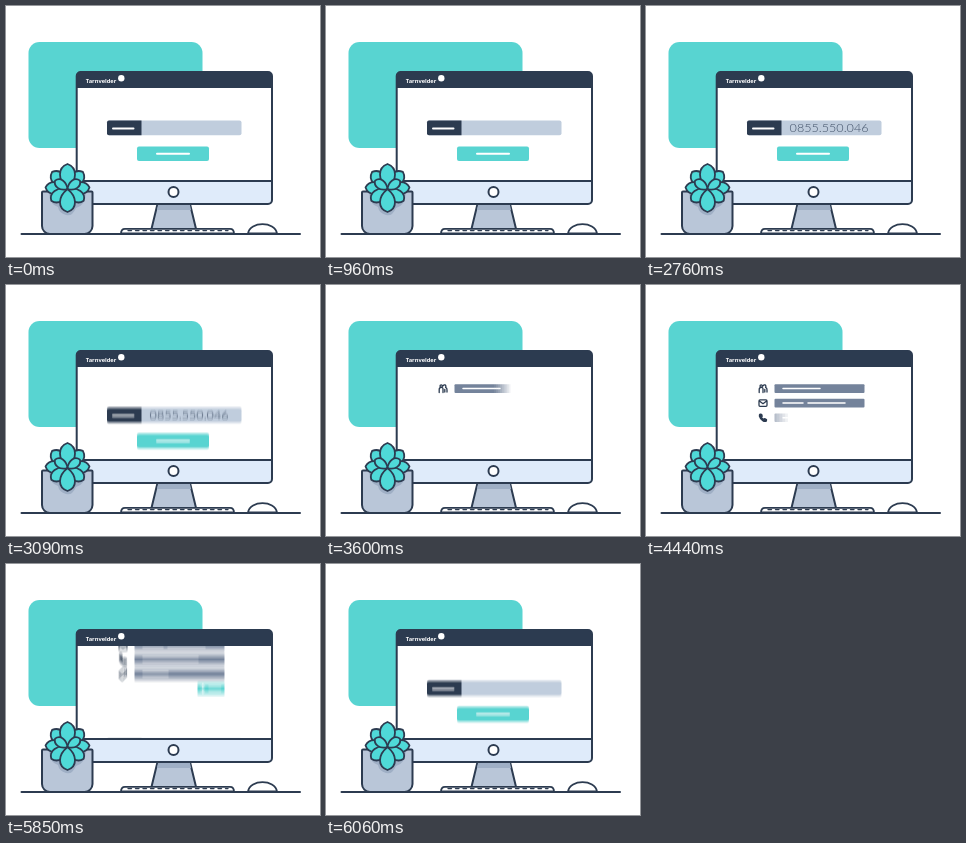
An HTML page with a canvas for the animation above (6.09 s loop, 314x251 px).

```html
<!DOCTYPE html>
<html lang="en">
<head>
<meta charset="utf-8">
<title>Desktop lookup</title>
<style>
  html, body { margin: 0; width: 314px; height: 251px; overflow: hidden; background: #fff; }
  canvas { display: block; }
</style>
</head>
<body>
<canvas id="stage" width="314" height="251"></canvas>
<script>
const W = 314, H = 251, LOOP = 6090;
const INK = '#2c3b50', TEAL = '#58d4d1', GREY = '#b9c6d8', FIELD = '#c0cddd', BAR = '#74839b';
const NUMBER = '0855.550.046';
const SHUTTER = 30, SAMPLES = 10;

const layer = () => Object.assign(document.createElement('canvas'), { width: W, height: H });
const stage = document.getElementById('stage').getContext('2d');
const backdrop = layer(), screen = layer();

const clamp = v => Math.min(1, Math.max(0, v));
const progress = (t, start, length) => clamp((t - start) / length);
const outCubic = u => 1 - (1 - u) ** 3;
const outBack = (u, c = 2.5) => 1 + (c + 1) * (u - 1) ** 3 + c * (u - 1) ** 2;
const smooth = u => u * u * (3 - 2 * u);

function box(g, x, y, w, h, r, fill, stroke) {
  g.beginPath();
  g.roundRect(x, y, w, h, r);
  paint(g, fill, stroke);
}

function disc(g, x, y, r, fill, stroke) {
  g.beginPath();
  g.arc(x, y, r, 0, 7);
  paint(g, fill, stroke);
}

function shape(g, d, fill, stroke) {
  const p = new Path2D(d);
  if (fill) { g.fillStyle = fill; g.fill(p); }
  if (stroke) { g.strokeStyle = stroke; g.stroke(p); }
}

function paint(g, fill, stroke) {
  if (fill) { g.fillStyle = fill; g.fill(); }
  if (stroke) { g.strokeStyle = stroke; g.stroke(); }
}

function line(g, x1, x2, y, width, color = '#fff') {
  g.lineWidth = width;
  g.strokeStyle = color;
  g.beginPath();
  g.moveTo(x1, y);
  g.lineTo(x2, y);
  g.stroke();
}

function leaf(g, angle, length, width) {
  g.save();
  g.translate(61.5, 183);
  g.rotate(angle * Math.PI / 180);
  g.beginPath();
  g.moveTo(0, 0);
  g.bezierCurveTo(-width, -length * 0.35, -width, -length * 0.86, 0, -length);
  g.bezierCurveTo(width, -length * 0.86, width, -length * 0.35, 0, 0);
  paint(g, '#4fd9d8', INK);
  g.restore();
}

function drawPlant(g) {
  g.lineWidth = 2;
  box(g, 36, 185.5, 50.5, 42.5, [1, 1, 8, 8], GREY, INK);
  shape(g, 'M43 187H80Q79 200 70 202Q66 211 60 209Q53 207 52 201Q44 199 43 187Z', '#9fafc5');
  g.lineWidth = 1.8;
  leaf(g, -42, 23, 9);
  leaf(g, 42, 23, 9);
  leaf(g, 0, 25, 10);
  leaf(g, -86, 22, 8);
  leaf(g, 86, 22, 8);
  leaf(g, -126, 20, 8);
  leaf(g, 126, 20, 8);
  leaf(g, -56, 15, 6);
  leaf(g, 56, 15, 6);
  leaf(g, 180, 23, 10);
}

function drawBackdrop() {
  const g = backdrop.getContext('2d');
  g.lineCap = g.lineJoin = 'round';
  g.fillStyle = '#fff';
  g.fillRect(0, 0, W, H);
  box(g, 22.5, 36, 174, 106, 11, TEAL);

  // monitor
  g.lineWidth = 2;
  shape(g, 'M151.5 198H184L191 227H144.5Z', GREY, INK);
  shape(g, 'M152 199H184L185 204H151Z', '#9fafc5');
  box(g, 70.7, 66, 195.3, 132, 4, '#fff');
  box(g, 71, 175, 195, 23, [0, 0, 4, 4], '#dfebfa');
  box(g, 71, 66, 195, 16, [4, 4, 0, 0], INK);
  line(g, 71, 266, 175, 1.8, INK);
  g.lineWidth = 2;
  box(g, 70.7, 66, 195.3, 132, 4, null, INK);
  disc(g, 167.5, 186, 5, '#fff', INK);

  g.fillStyle = '#fff';
  g.font = '700 5.7px "Open Sans", sans-serif';
  g.fillText('Tarnvelder', 79.8, 76.6);
  disc(g, 115.3, 72.3, 3.2, '#fff');

  // keyboard, mouse, desk
  g.lineWidth = 1.8;
  shape(g, 'M115 227.5Q115 222.8 119 222.8H224Q228 222.8 228 227.5Z', '#fff', INK);
  g.setLineDash([3.5, 4]);
  line(g, 122, 222, 224.6, 1.4, INK);
  g.setLineDash([]);
  g.lineWidth = 1.8;
  shape(g, 'M242 227.5C244 215 269 215 271 227.5Z', '#fff', INK);
  line(g, 15.5, 294, 228, 2, INK);

  drawPlant(g);
}

function drawForm(g, typed, caret) {
  box(g, 101, 114.5, 134.5, 14.8, 2, FIELD);
  box(g, 101, 114.5, 34.5, 14.8, [2, 0, 0, 2], INK);
  line(g, 107, 127.5, 122.5, 2);
  box(g, 131, 140.5, 72, 14.5, 2, TEAL);
  line(g, 151, 183, 147.8, 2);
  g.fillStyle = '#3f4f66';
  if (caret) g.fillRect(141, 117, 1, 9);
  g.font = '300 12.6px Lato, sans-serif';
  g.fillText(NUMBER.slice(0, typed), 143.6, 126);
}

// each icon is centred on 0,0
const icons = [
  'M-3.8 4V1Q-3.8-1.2-1.8-1.2T0 1V4M-3-2.5a1.2 1.2 0 1 0 2.4 0a1.2 1.2 0 1 0-2.4 0M.2-2.8Q.8-4 2-3.6Q3.4-3 2.6-1.2Q4.2-.6 4 1.4V3.6M1.8 1V3.6',
  'M-3-3.2H3Q4-3.2 4-2.2V2.2Q4 3.2 3 3.2H-3Q-4 3.2-4 2.2V-2.2Q-4-3.2-3-3.2ZM-3.6-2.2L0 .6L3.6-2.2',
  'M-2.8-3.6L-1.4-3.4L-.8-1.4L-1.6-.6Q-.8 1 .8 1.7L1.6.9L3.5 1.8L3.4 3.2Q2 4.4-.2 3Q-3 1-3.6-1.6Q-3.8-3-2.8-3.6Z',
  'M-3.8 .2L0-3.4L3.4-3.5L3.5-.4L-.3 3.6Q-1 4.1-1.7 3.4L-3.7 1.4Q-4.2.8-3.8.2ZM1.4-1.5h.3'
];

const rows = [
  { start: 3540, lines: [[137, 174]] },
  { start: 4010, lines: [[137, 157], [162, 199]] },
  { start: 4440, lines: [[137, 192]] },
  { start: 4890, lines: [[137, 162]] }
];

function drawRow(g, i, t, s) {
  const { start, lines } = rows[i], y = 103.5 + 14.6 * i;
  if (t >= 3330 + 450 * i) {
    g.save();
    g.translate(117, y);
    g.lineWidth = 1.3;
    shape(g, icons[i], i === 2 ? INK : null, INK);
    g.restore();
  }
  const reveal = outCubic(progress(s, start, 270));
  if (!reveal) return;
  g.save();
  g.beginPath();
  g.rect(128, y - 6, 91 * reveal, 12);
  g.clip();
  box(g, 128.5, y - 4.3, 90, 8.7, 1, BAR);
  for (const [a, b] of lines) line(g, a, b, y, 1.5);
  g.restore();
}

function drawAddButton(g, s) {
  const u = progress(s, 5120, 240);
  if (!u) return;
  const k = Math.max(0, outBack(u));
  g.save();
  g.translate(205, 162);
  g.scale(k, k);
  box(g, -13.5, -4.4, 27, 8.7, 1, TEAL);
  shape(g, 'M-8.9-2.4h1.5v1.6h1.6v1.5h-1.6v1.6h-1.5v-1.6h-1.6v-1.5h1.6Z', '#fff');
  line(g, -2, 9.7, 0, 1.5);
  g.restore();
}

// t drives hard changes, s is the shutter time that drives motion
function drawScreen(t, s) {
  const g = screen.getContext('2d');
  const scroll = 100 * smooth(progress(s, 5520, 575) ** 1.6);
  g.clearRect(0, 0, W, H);
  g.save();
  g.lineCap = g.lineJoin = 'round';
  g.beginPath();
  g.rect(96, 82, 144, 92);
  g.clip();
  g.fillStyle = '#fff';
  g.fillRect(96, 82, 144, 92);

  if (t < 3270 || t > 5500) {
    const back = t > 5500;
    const drop = back ? 100 - scroll : 63 * progress(s, 2760, 480) ** 5.5;
    const typed = back ? 0 : Math.max(0, Math.floor((t - 1845) / 75) + 1);
    const caret = t < 1920 && Math.floor(t / 60) % 2 === 1;
    g.save();
    g.translate(0, drop);
    drawForm(g, typed, caret);
    g.restore();
  }
  if (t >= 3270) {
    g.translate(0, -scroll);
    rows.forEach((_, i) => drawRow(g, i, t, s));
    drawAddButton(g, s);
  }
  g.restore();
}

function render(t) {
  stage.globalAlpha = 1;
  stage.drawImage(backdrop, 0, 0);
  for (let i = 0; i < SAMPLES; i++) {
    drawScreen(t, t + SHUTTER * ((i + 0.5) / SAMPLES - 0.5));
    stage.globalAlpha = 1 / (i + 1);
    stage.drawImage(screen, 0, 0);
  }
}

drawBackdrop();
const begin = performance.now();
function tick() {
  render((performance.now() - begin) % LOOP);
  requestAnimationFrame(tick);
}
tick();
</script>
</body>
</html>
```
